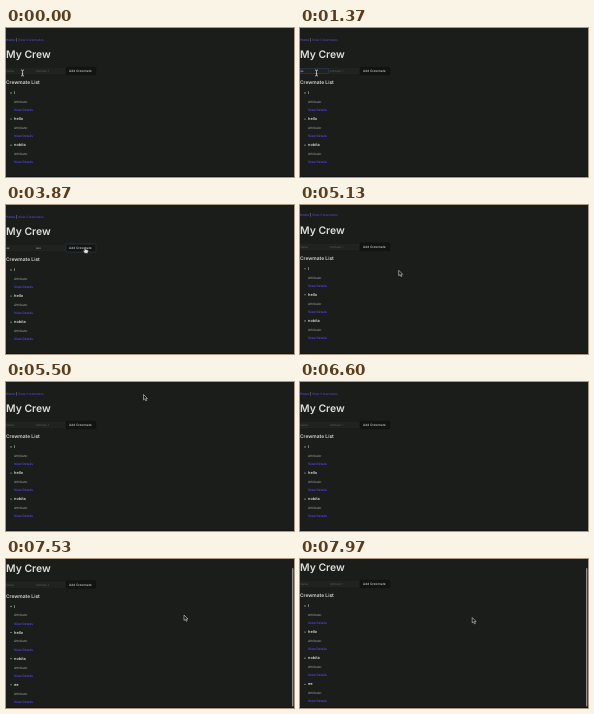
An HTML page for the animation above (8 s loop, 288 by 149 pixels).

```html
<!DOCTYPE html>
<html lang="en">
<head>
<meta charset="utf-8">
<title>My Crew</title>
<style>
  html, body { margin: 0; width: 100%; height: 100%; overflow: hidden; background: #1b1d1a; }
  svg { display: block; width: 100vw; height: 100vh; }
  text { font-family: Inter, Roboto, sans-serif; font-size: 3.2px; fill: #d6d7d5; text-rendering: geometricPrecision; }
  .title { font-size: 10.4px; font-weight: 600; fill: #dededc; }
  .subtitle { font-size: 4.9px; font-weight: 600; }
  .name { font-size: 3.9px; font-weight: 600; }
  .attr { fill: #a9aaa8; }
  .link { fill: #5247e6; font-weight: 600; }
  .nav { fill: #524bd0; font-weight: 600; }
  .field { font-size: 2.7px; }
  .box { fill: #20221f; stroke: #2d2f2c; stroke-width: .3; }
  .button { fill: #121411; stroke-width: .5; }
  .label { font-weight: 500; fill: #c8c9c7; }
  .pointer path { fill: #151614; stroke: #d0d0ce; stroke-width: .6; stroke-linejoin: round; }
</style>
</head>
<body>
<svg viewBox="0 0 288 149" preserveAspectRatio="none">
  <rect width="288" height="149" fill="#1b1d1a"/>
  <g id="page">
    <text class="nav" x="0" y="12.5">Home <tspan fill="#aaa">|</tspan> <tspan fill="#4541ae">View Crewmates</tspan></text>
    <text class="title" x="0" y="30.2">My Crew</text>
    <rect class="box" id="nameBox" x=".2" y="40.7" width="28.5" height="5"/>
    <rect class="box" id="attrBox" x="29.3" y="40.7" width="29.7" height="5"/>
    <text class="field" id="nameText" x=".5" y="44.2"></text>
    <text class="field" id="attrText" x="30" y="44.2"></text>
    <rect class="button" id="button" x="60" y="39" width="30" height="8" rx="1.5"/>
    <text class="label" x="63" y="44.2">Add Crewmate</text>
    <text class="subtitle" x="0" y="56.4">Crewmate List</text>
    <g id="list"></g>
  </g>
  <rect id="scrollbar" x="286" y="9" width="1.4" height="138.5" rx=".7" fill="#8c8e8b"/>
  <rect y="148" width="288" height="1" fill="#151414"/>
  <g class="pointer" id="arrow"><path d="M0 0V5.4L1.3 4.3L2.3 6.3L3.2 5.9L2.3 4H4Z"/></g>
  <g class="pointer" id="hand"><path d="M0 0Q1-.7 1.2 .5V2L3.4 2.6Q4.2 2.9 3.8 4.1L3.2 5.8H.4L-1.2 3.5Q-1.1 2.7 0 3.3Z" style="fill:#e4e4e2;stroke:#222;stroke-width:.4"/></g>
  <g id="beam"><path d="M-1.4-3Q0-3 0-2V2Q0 3-1.4 3M1.4-3Q0-3 0-2M0 2Q0 3 1.4 3M-.8 .9H.8" fill="none" stroke="#d0d0ce" stroke-width=".8"/></g>
</svg>
<script>
const LOOP = 8000;
const $ = id => document.getElementById(id);
const show = (el, on) => el.setAttribute('visibility', on ? 'visible' : 'hidden');
const move = (el, x, y) => el.setAttribute('transform', `translate(${x} ${y})`);

const row = (name, i) => `<g transform="translate(0 ${i * 26.1})">
  <circle cx="5" cy="64.9" r=".55" fill="#d6d7d5"/>
  <text class="name" x="8" y="66.2">${name}</text>
  <text class="attr" x="8" y="74.9">Attribute:</text>
  <text class="link" x="8" y="83.1">View Details</text></g>`;
$('list').innerHTML = ['l', 'hello', 'nobita', 'ee'].map(row).join('');
const newRow = $('list').lastElementChild;

// Eased interpolation through [time, ...values] keys.
function track(keys, t) {
  const next = keys.findIndex(k => k[0] > t);
  if (next < 0) return keys[keys.length - 1].slice(1);
  if (next === 0) return keys[0].slice(1);
  const a = keys[next - 1], b = keys[next];
  const u = (t - a[0]) / (b[0] - a[0]), e = u * u * (3 - 2 * u);
  return a.slice(1).map((v, i) => v + (b[i + 1] - v) * e);
}

const pointerPath = [
  [0, 16.5, 45], [1800, 16.5, 45], [2400, 38, 45.5], [3230, 38, 45.5], [3630, 78.4, 42.5],
  [3900, 78.4, 42.5], [4480, 98.7, 65.3], [5130, 98.7, 65.3], [5500, 137.5, 12.5],
  [6630, 150, -9], [7250, 178, 56], [7530, 178, 56], [7900, 172.2, 58.5]
];
const scrollPath = [
  [0, 0], [4700, 0], [4950, -1.2], [5200, -1.2], [5470, 0], [6850, 0], [7280, -17.5], [7530, -17.5], [7800, -18]
];

function setField(el, value, hint) {
  el.textContent = value || hint;
  el.style.fill = value ? '#c4c5c3' : '#60625f';
}

function outline(el, on, idle) {
  el.style.stroke = on ? '#2d4566' : idle;
  el.style.strokeWidth = on ? .5 : .3;
}

function draw(t) {
  const [x, y] = track(pointerPath, t);
  const sent = t >= 3960;
  move($('page'), 0, track(scrollPath, t)[0]);

  setField($('nameText'), sent ? '' : 'ee'.slice(0, t < 1000 ? 0 : t < 1200 ? 1 : 2), 'Name');
  setField($('attrText'), sent ? '' : 'ooo'.slice(0, t < 2630 ? 0 : Math.floor((t - 2630) / 130) + 1), 'Attribute 1');
  outline($('nameBox'), t >= 300 && t < 2300, '#2d2f2c');
  outline($('attrBox'), t >= 2300 && t < 3750, '#2d2f2c');
  outline($('button'), t >= 3550 && t < 4100, '#121411');

  const overField = t < 3330, overButton = t >= 3480 && t < 4080;
  show($('beam'), overField);
  show($('hand'), overButton);
  show($('arrow'), !overField && !overButton && (t < 5530 || t >= 6630));
  ['beam', 'hand', 'arrow'].forEach(id => move($(id), x, y));

  show(newRow, t >= 6660);
  show($('scrollbar'), t >= 6850);
}

function tick(now) {
  draw(now % LOOP);
  requestAnimationFrame(tick);
}
draw(0);
requestAnimationFrame(tick);
</script>
</body>
</html>
```
